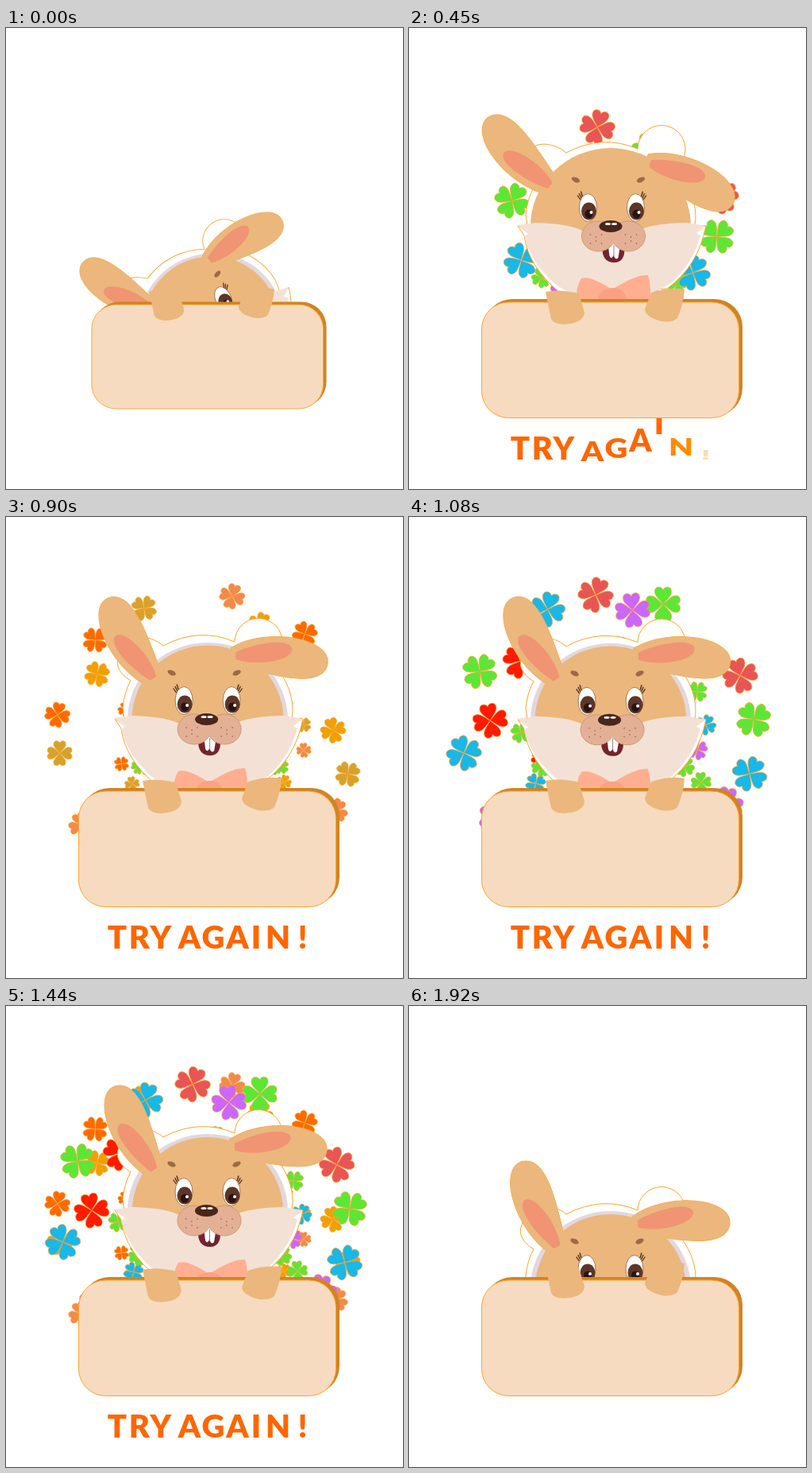
These frames come from a looping animation (500 by 580 pixels, 1950 ms). An HTML page with a canvas:

```html
<!DOCTYPE html>
<html>
<head>
<meta charset="utf-8">
<style>
html, body { margin: 0; width: 100%; height: 100%; overflow: hidden; background: #fff; }
canvas { display: block; }
</style>
</head>
<body>
<canvas id="stage" width="500" height="580"></canvas>
<script>
const c = document.getElementById('stage').getContext('2d');
const LOOP = 1950, STEP = 30;
const TAN = '#ebb77c', CREAM = '#f4e1d5', EDGE = '#ffa32b', BROWN = '#5d3629';
const clamp = (v, a = 0, b = 1) => Math.min(b, Math.max(a, v));

// Eased keyframes: rows of [time, value]
function keys(t, rows) {
  let i = 0;
  while (i < rows.length - 2 && t >= rows[i + 1][0]) i++;
  const [t0, a] = rows[i], [t1, b] = rows[i + 1];
  const u = clamp((t - t0) / (t1 - t0));
  return a + (b - a) * u * u * (3 - 2 * u);
}

function paint(path, fill, edge, width = 1) {
  if (fill) { c.fillStyle = fill; c.fill(path); }
  if (edge) { c.strokeStyle = edge; c.lineWidth = width; c.stroke(path); }
}
function oval(x, y, rx, ry, fill, edge, rot = 0) {
  const p = new Path2D();
  p.ellipse(x, y, rx, ry, rot, 0, 7);
  paint(p, fill, edge);
}
function group(x, y, deg, sx, sy, draw) {
  c.save();
  c.translate(x, y);
  c.rotate(deg * Math.PI / 180);
  c.scale(sx, sy);
  draw();
  c.restore();
}

const shape = d => new Path2D(d);
const EAR = shape('M-9 5C-42-38-36-121-2-118C30-113 19-50 11 5Z');
const EAR_PINK = shape('M-4-2C-13-22-22-66-8-73C8-76 15-28 5-2Z');
const STICKER = shape('M137 254L150 262L147 240Q149 220 157 206Q135 192 142 175C150 143 182 148 198 162Q243 138 288 157A30 30 0 0 1 348 158Q346 177 338 186C355 206 364 230 360 253L374 254Q364 305 325 333L190 338Q150 305 145 266Z');
const CHEEKS = shape('M136 253L160 250Q205 251 222 262Q256 275 292 258Q315 250 350 250L374 254L362 263L367 266Q358 300 330 326Q290 350 256 350Q195 345 172 315Q151 292 145 267L150 264Z');
const BOW = shape('M256 334C240 324 226 317 217 320Q210 331 211 348H304Q305 328 301 316C288 315 270 325 256 334Z');
const KNOT = shape('M238 346Q240 333 256 332Q270 331 274 346Z');
const MOUTH = shape('M242 280Q241 300 257 300Q271 300 270 280Z');
const TEETH = shape('M249 276L251 292Q254 297 256 291Q259 298 262 294L265 276Z');
const HANDS = [
  shape('M172 332Q190 328 214 334L221 358Q220 369 203 372Q184 375 179 366Z'),
  shape('M347 329Q330 325 305 333L297 354Q298 364 318 369Q332 371 338 365Q346 347 347 329Z')
];
const PETAL = shape('M0 0C-.22-.3-.62-.55-.45-.9C-.32-1.06-.05-1-0-.82C.05-1 .32-1.06 .45-.9C.62-.55 .22-.3 0 0Z');

// Clover kinds: start colour, end colour, delay, life, shrink of radius, swirl
const KINDS = [
  [[232, 85, 85], [255, 150, 10], 0, 540, .97, 0],
  [[94, 230, 53], [240, 160, 0], 30, 572, .85, .06],
  [[24, 184, 232], [214, 162, 44], 59, 572, .94, 0],
  [[204, 102, 255], [242, 138, 78], 90, 572, .94, 0],
  [[255, 26, 0], [255, 106, 0], 114, 572, .95, 0],
  [[94, 230, 53], [94, 230, 53], -110, 572, 1, 0]
];
const OUTER = [
  [0, 235, 97], [0, 418, 199], [1, 85, 192], [1, 322, 105], [1, 439, 254],
  [2, 169, 104], [2, 56, 298], [2, 442, 326], [3, 287, 88], [3, 85, 394],
  [3, 425, 375], [3, 271, 476], [4, 105, 148], [4, 55, 247], [4, 383, 140]
];
const INNER = [
  [3, 233, 159], [3, 383, 294], [1, 265, 160], [1, 366, 218], [1, 371, 335],
  [1, 138, 271], [4, 304, 165], [4, 140, 312], [4, 145, 240], [0, 203, 177],
  [0, 342, 190], [2, 170, 200], [2, 383, 260], [2, 153, 339], [0, 214, 213],
  [0, 266, 203], [5, 167, 314], [5, 347, 314]
];
const BURSTS = [330, 870, 1236];

function clover([kind, x, y], size, age, spin) {
  const [from, to, delay, life, shrink, swirl] = KINDS[kind];
  if (age < Math.max(0, delay) || age > life) return;
  const grow = 1 - (1 - clamp((age - delay) / 255)) ** 3;
  const late = clamp((age - 320) / 240);
  const r = grow * (1 + (shrink - 1) * late), a = swirl * late;
  const dx = (x - 250) * r, dy = (y - 285) * r;
  const s = size * (1 - .28 * clamp((age - 260) / 310));
  const px = 250 + dx * Math.cos(a) - dy * Math.sin(a);
  const py = 285 + dx * Math.sin(a) + dy * Math.cos(a);
  const rgb = from.map((v, i) => Math.round(v + (to[i] - v) * late));
  group(px, py, spin + age * .06, s, s, () => {
    for (let i = 0; i < 4; i++) {
      paint(PETAL, `rgb(${rgb})`, EDGE, .7 / s);
      c.rotate(Math.PI / 2);
    }
  });
}

function clovers(t) {
  for (const start of BURSTS) {
    const age = t - start;
    INNER.forEach((p, i) => clover(p, 12.5, age, i * 37 + 15));
    OUTER.forEach((p, i) => clover(p, 21.5, age, i * 53 + 8));
  }
}

const LETTERS = [...'TRYAGAIN!'];
const LETTER_X = [140, 168, 195, 231, 261, 291.5, 315, 342.5, 373.5];

function words(t) {
  const clock = t < 1574 ? t : 492 - (t - 1680) * 1.3;
  c.font = '900 40px Lato, "Open Sans", sans-serif';
  c.textAlign = 'center';
  LETTERS.forEach((ch, i) => {
    const k = (clock - 210) / STEP - i;
    if (k < 0) return;
    const lift = keys(k, [[0, 0], [1, -5], [2, -32], [3, -10], [4, -2], [5, 2], [6, 0]]);
    const tall = keys(k, [[0, .4], [1, .75], [2, 1], [3, 1], [4, .87], [5, .83], [6, 1]]);
    c.globalAlpha = clamp(.3 + k * .7);
    c.fillStyle = k < 1.2 ? '#ff8c00' : '#ff6600';
    group(LETTER_X[i], 543 + lift, 0, 1, tall, () => c.fillText(ch, 0, 0));
    c.globalAlpha = 1;
  });
}

function eye(x, side) {
  oval(x, 231, 11, 17.5, '#fff', '#a67850');
  oval(x + 1, 235.5, 9.5, 11, BROWN);
  oval(x + 1, 239, 5, 5.5, '#2a130e');
  oval(x + 4, 237, 2, 2, '#fff');
  const lash = new Path2D();
  for (let i = 0; i < 3; i++) {
    lash.moveTo(x + side * (7 + i * 1.3), 217 + i * 2);
    lash.lineTo(x + side * (9 + i * 2.2), 210.5 + i * 2.5);
  }
  paint(lash, null, '#4a281c', 1.3);
  oval(x + side * 11 - 4.5, 196, 5.5, 3, '#9c6a45', null, -side * .45);
}

function muzzle() {
  paint(MOUTH, '#74232c');
  paint(TEETH, '#fff');
  const line = shape('M256.500 278V293');
  paint(line, null, '#8b5a50', .8);
  for (const x of [237, 275]) oval(x, 267, 21, 19, '#e3b096', '#cd9a72');
  oval(256, 264, 11, 13, '#e3b096');
  for (let i = 0; i < 6; i++) {
    const dx = i % 3 * 7, dy = 265 + (i > 2 ? 8 : 0) + i % 2 * 3;
    oval(227 + dx, dy, .8, .8, '#8f5644');
    oval(285 - dx, dy, .8, .8, '#8f5644');
  }
  oval(252.5, 254.500, 14.5, 7.5, '#4a2519');
  oval(249, 251.5, 3.500, 1.5, '#fff');
  oval(257, 251.5, 3.500, 1.5, '#fff');
}

function rabbit(t) {
  const left = keys(t, [[0, -30.5], [300, -46], [450, -41], [900, -28], [1440, -23.5], [1560, -27], [1680, -40], [1920, -21]]);
  const right = keys(t, [[0, -3], [300, 32], [450, 28], [900, 7], [1440, 4], [1560, 10], [1680, 27], [1920, 1.5]]);
  const droop = clamp((right - 5) / 23);
  const ears = edge => {
    const ear = () => {
      paint(EAR, TAN, edge && EDGE);
      c.rotate(-.14);
      if (!edge) paint(EAR_PINK, '#f09474');
    };
    group(187 - 8 * droop, 205, left, 1, 1, ear);
    group(286 + 16 * droop, 174, 90 + right, 1, 1, ear);
  };
  const dome = (rx, ry, fill) => {
    const p = new Path2D();
    p.ellipse(254, 255, rx, ry, 0, Math.PI, 0);
    p.lineTo(330, 300);
    p.lineTo(180, 300);
    paint(p, fill);
  };

  paint(STICKER, '#fff', EDGE);
  paint(BOW, '#ffae90');
  paint(KNOT, '#fba183');
  dome(101, 97, '#e3d7de');
  ears(true);
  dome(95 + 6 * droop, 93 + 6 * droop, TAN);
  ears(false);
  paint(CHEEKS, CREAM);
  paint(BOW, '#ffae90');
  paint(KNOT, '#fba183');
  c.save();
  c.translate(droop * 1.5, 0);
  eye(224, -1);
  eye(284, 1);
  muzzle();
  c.restore();
}

function board() {
  const back = new Path2D(), front = new Path2D();
  back.roundRect(95, 341, 325, 147, 35);
  front.roundRect(91.5, 345, 324, 145.5, 34);
  paint(back, '#d08424');
  paint(front, '#f6dbc0', EDGE);
}

function draw(t) {
  c.fillStyle = '#fff';
  c.fillRect(0, 0, 500, 580);
  clovers(t);
  words(t);
  const size = keys(t, [[0, .9], [150, 1]]);
  const dx = keys(t, [[0, 4], [240, 0]]);
  const dy = keys(t, [[0, 115], [60, 112], [330, -11], [450, -5], [900, 0], [1440, 3], [1570, 3], [1680, 92], [1920, 100]]);
  const tilt = keys(t, [[0, -24], [240, 0]]);
  group(255.5, 416 - (1 - size) * 40, 0, size, size, () => {
    c.translate(-255.5, -416);
    group(256 + dx, 255 + dy, tilt, 1, 1, () => {
      c.translate(-256, -255);
      rabbit(t);
    });
    board();
    c.translate(0, -.05 * Math.max(0, dy));
    HANDS.forEach(h => paint(h, TAN));
  });
}

const begin = performance.now();
function frame() {
  const t = (performance.now() - begin) % LOOP;
  draw(Math.floor(t / STEP) * STEP);
  requestAnimationFrame(frame);
}
frame();
</script>
</body>
</html>
```
